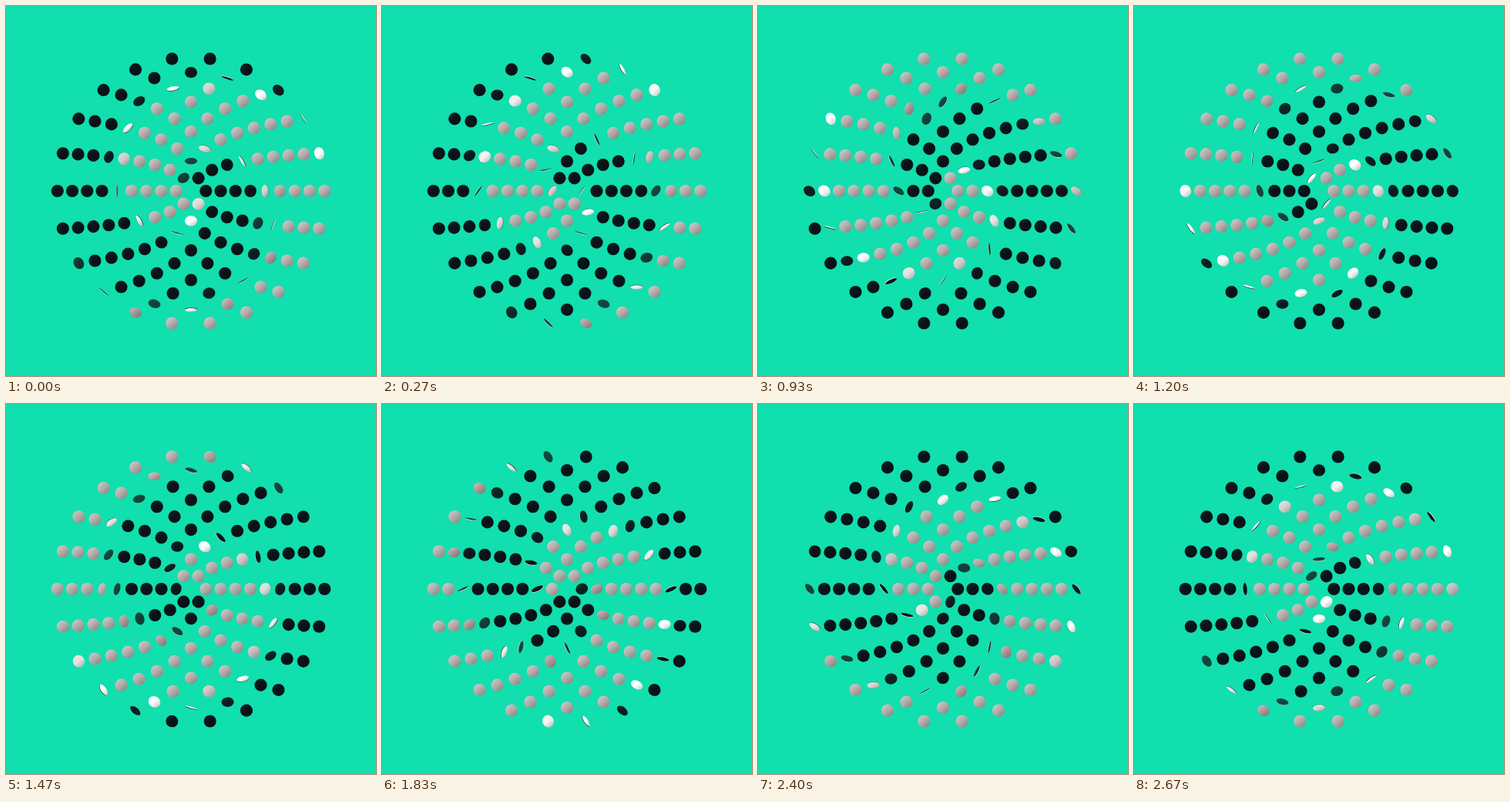
Animation of 480 by 480 pixels, one loop 2.71 s. Source, as an HTML page:

```html
<!DOCTYPE html>
<html lang="en">
<head>
<meta charset="utf-8">
<title>Flipping discs</title>
<style>
html, body { margin: 0; width: 100%; height: 100%; overflow: hidden; background: #11dfad; }
svg { display: block; width: 100vw; height: 100vh; }
</style>
</head>
<body>
<svg id="stage" viewBox="0 0 480 480">
  <defs>
    <linearGradient id="sheen" x1="0.15" y1="0.1" x2="0.85" y2="0.9">
      <stop offset="0" stop-color="#fff" stop-opacity="0.34"/>
      <stop offset="0.5" stop-color="#fff" stop-opacity="0"/>
      <stop offset="0.5" stop-color="#000" stop-opacity="0"/>
      <stop offset="1" stop-color="#000" stop-opacity="0.2"/>
    </linearGradient>
  </defs>
  <rect width="480" height="480" fill="#11dfad"/>
</svg>
<script>
const LOOP = 2710, FRAMES = 81, STEP = 100 / 3;
const RINGS = 9, GAP = 19.25, RADIUS = 8.05, HALF_THICK = 0.3, SPREAD = 40;
const RAD = Math.PI / 180;

const GREY = [177, 171, 170], WHITE = [255, 255, 253], ROSE = [165, 147, 146];
const BLACK = [9, 19, 23], TEAL = [19, 68, 60];

const stage = document.getElementById('stage');
const clamp = (x, lo, hi) => Math.min(hi, Math.max(lo, x));
const wrap = a => ((a + 180) % 360 + 360) % 360 - 180;
const ramp = (a, b, x) => {
  const u = clamp((x - a) / (b - a), 0, 1);
  return u * u * (3 - 2 * u);
};
const mix = (a, b, u) => a.map((v, i) => v + (b[i] - v) * u);
const rgb = c => `rgb(${c.map(Math.round).join()})`;

function add(parent, tag, attrs) {
  const el = document.createElementNS('http://www.w3.org/2000/svg', tag);
  for (const key in attrs) el.setAttribute(key, attrs[key]);
  return parent.appendChild(el);
}

function makeDisc(ring, angle) {
  const g = add(stage, 'g', {});
  return {
    ring, angle,
    x: 240 + ring * GAP * Math.cos(angle * RAD),
    y: 240 - ring * GAP * Math.sin(angle * RAD),
    back: add(g, 'circle', { r: RADIUS }),
    front: add(g, 'circle', { r: RADIUS }),
    gloss: add(g, 'circle', { r: RADIUS, fill: 'url(#sheen)' })
  };
}

const discs = [];
for (let ring = 1; ring <= RINGS; ring++) {
  const count = 4 + 2 * ring;
  for (let i = 0; i < count; i++) discs.push(makeDisc(ring, i * 360 / count));
}

// The pale face flares as it arrives; as it leaves it dims, then flares.
function paleColor(rising, d, tilt) {
  const glare = 1 - 0.5 * Math.max(0, -Math.cos(tilt * RAD)) ** 4;
  if (rising) return mix(GREY, WHITE, glare * (1 - ramp(18, 32, d)));
  return mix(mix(GREY, ROSE, ramp(-28, -18, d)), WHITE, 0.85 * glare * ramp(-15, -6, d));
}

function darkColor(rising, d) {
  if (rising) return mix(BLACK, TEAL, 0.25 * ramp(-24, -13, d) * (1 - ramp(-10, -4, d)));
  return mix(BLACK, TEAL, ramp(-2, 6, d) * (1 - ramp(12, 25, d)));
}

function drawDisc(disc, spin) {
  const { ring, angle, x, y } = disc;
  const inner = ring < 6;
  const lean = ring / RINGS * Math.cos(spin * RAD);
  const phase = spin - angle - 36 * ring;
  const toPale = wrap(phase + 1 - 4 * lean);
  const toDark = wrap(phase - (inner ? 188 + 3 * lean : 169.5 - 3 * lean));
  const rising = Math.abs(toPale) < Math.abs(toDark);
  const d = rising ? toPale : toDark;

  const u = clamp(d / SPREAD, -1, 1);
  const turn = (rising ? 1 : -1) * (1.5 * u - 0.5 * u ** 3) * 90 * RAD;
  const facing = Math.sin(turn), side = Math.cos(turn);
  const tilt = angle - spin;
  const shift = HALF_THICK * side * (inner && !rising ? -1 : 1);
  const squash = Math.max(0.06, Math.abs(facing));

  const place = sign => {
    const px = x + sign * shift * Math.cos(tilt * RAD);
    const py = y - sign * shift * Math.sin(tilt * RAD);
    return `translate(${px.toFixed(2)} ${py.toFixed(2)}) rotate(${-tilt}) scale(${squash} 1) rotate(${tilt})`;
  };
  const pale = rgb(paleColor(rising, d, tilt)), dark = rgb(darkColor(rising, d));
  const up = facing > 0;

  disc.back.setAttribute('transform', place(up ? -1 : 1));
  disc.back.setAttribute('fill', up ? dark : pale);
  // A nearly flat disc hides its far face.
  disc.back.setAttribute('opacity', 1 - ramp(0.3, 0.7, squash));
  disc.front.setAttribute('transform', place(up ? 1 : -1));
  disc.front.setAttribute('fill', up ? pale : dark);
  disc.gloss.setAttribute('transform', place(up ? 1 : -1));
  disc.gloss.setAttribute('opacity', up ? 1 : 0.12);
}

function render(ms) {
  const frame = Math.min(FRAMES - 1, Math.floor((ms % LOOP + 4) / STEP));
  const spin = frame * 360 / FRAMES;
  for (const disc of discs) drawDisc(disc, spin);
}

let start;
function tick(now) {
  if (start === undefined) start = now;
  render(Math.max(0, now - start));
  requestAnimationFrame(tick);
}
render(0);
requestAnimationFrame(tick);
</script>
</body>
</html>
```
